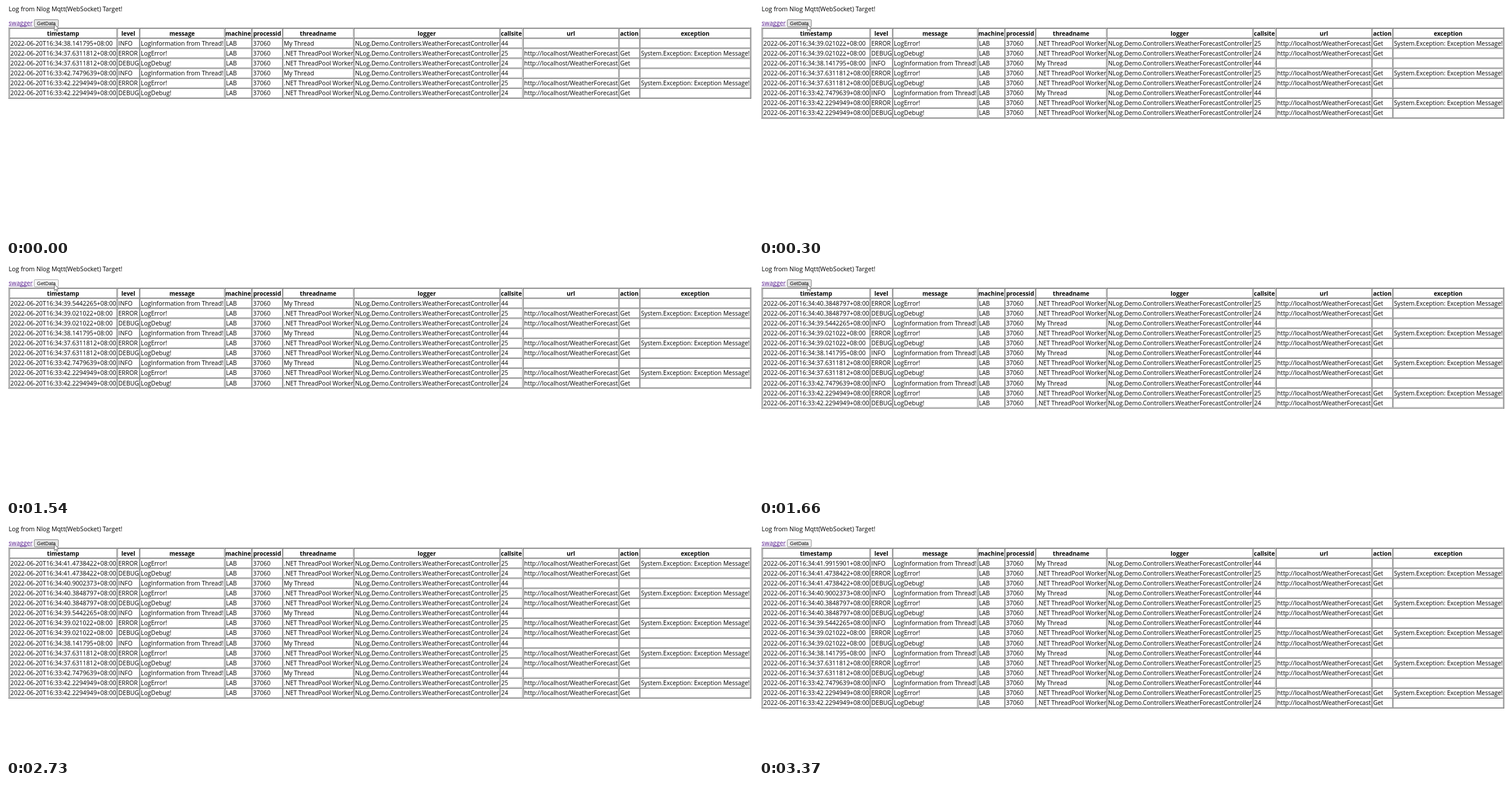
An HTML page with a canvas for the animation above (3.91 s loop, 1280x398 px).

```html
<!DOCTYPE html>
<html lang="en">
<head>
<meta charset="utf-8">
<title>Log table</title>
<style>
html, body { margin: 0; width: 100%; height: 100%; overflow: hidden; background: #fff; }
canvas { display: block; }
</style>
</head>
<body>
<canvas id="stage" width="1280" height="398"></canvas>
<script>
const ctx = document.getElementById('stage').getContext('2d');
const LOOP = 3910;
const SANS = '"Open Sans", "Noto Sans", sans-serif';
const BODY = `10.45px ${SANS}`;
const DIGITS = `10.58px ${SANS}`;
const HEAD = `bold 10.1px ${SANS}`;
const LEAD = `10.7px ${SANS}`;
const DARK = '#2c2c2c', GRAY = '#808080';

// Table geometry
const LEFT = 4.3, RIGHT = 1276.9, TOP = 36.9;
const LINE = 0.7, GAP = 0.8, PITCH = 17.12, BASE = 12.1, PAD = 1.8;
const edges = [5.8, 190.7, 229.3, 375, 421.5, 474.3, 596.1, 846.7, 886, 1050.6, 1086.3, 1276.2];
const heads = ['timestamp', 'level', 'message', 'machine', 'processid', 'threadname',
  'logger', 'callsite', 'url', 'action', 'exception'];

// Each stamp is one batch: requests and thread messages alternate
const stamps = ['33:42.2294949', '33:42.7479639', '34:37.6311812', '34:38.141795', '34:39.021022',
  '34:39.5442265', '34:40.3848797', '34:40.9002373', '34:41.4738422', '34:41.9915901'];
const arrivals = [300, 830, 1660, 2200, 2730, 3250];
const presses = [[150, 300], [1540, 1660]];
const path = [[0, 83, 31.5], [2850, 84, 34], [3000, 92, 62], [3120, 112, 190], [3250, 130, 386], [3370, 140, 420]];

function logRow(stamp, level, message, thread, line, isRequest) {
  return [`2022-06-20T16:${stamp}+08:00`, level, message, 'LAB', '37060', thread,
    'NLog.Demo.Controllers.WeatherForecastController', line,
    isRequest ? 'http://localhost/WeatherForecast' : '', isRequest ? 'Get' : '',
    level === 'ERROR' ? 'System.Exception: Exception Message!' : ''];
}

const batches = stamps.map((stamp, i) => i % 2
  ? [logRow(stamp, 'INFO', 'LogInformation from Thread!', 'My Thread', '44', false)]
  : [logRow(stamp, 'ERROR', 'LogError!', '.NET ThreadPool Worker', '25', true),
     logRow(stamp, 'DEBUG', 'LogDebug!', '.NET ThreadPool Worker', '24', true)]);

function text(str, x, y, font, color = '#000', align = 'left') {
  ctx.font = font;
  ctx.fillStyle = color;
  ctx.textAlign = align;
  ctx.fillText(str, x, y);
}

function bevel(x, y, w, h, light, shade) {
  ctx.fillStyle = light;
  ctx.fillRect(x, y, w, LINE);
  ctx.fillRect(x, y, LINE, h);
  ctx.fillStyle = shade;
  ctx.fillRect(x, y + h - LINE, w, LINE);
  ctx.fillRect(x + w - LINE, y, LINE, h);
}

function drawRow(cells, index, isHead) {
  const y = TOP + LINE + GAP + index * PITCH;
  cells.forEach((str, col) => {
    const x = edges[col], w = edges[col + 1] - GAP - x;
    bevel(x, y, w, PITCH - GAP, DARK, GRAY);
    if (isHead) text(str, x + w / 2, y + BASE, HEAD, '#000', 'center');
    else text(str, x + PAD, y + BASE, col ? BODY : DIGITS);
  });
}

function drawTable(t) {
  const count = 4 + arrivals.filter(at => t >= at).length;
  const rows = batches.slice(0, count).reverse().flat();
  const height = (rows.length + 1) * PITCH + 2 * LINE + GAP;
  bevel(LEFT, TOP, RIGHT - LEFT, height, GRAY, DARK);
  drawRow(heads, 0, true);
  rows.forEach((row, i) => drawRow(row, i + 1, false));
}

function drawButton(t) {
  const pressed = presses.some(([from, to]) => t >= from && t < to);
  const [fill, stroke] = pressed ? ['#f5f5f5', '#8d8d8d']
    : t < 3000 ? ['#e5e5e5', '#5c5c5c'] : ['#efefef', '#767676'];
  ctx.beginPath();
  ctx.roundRect(48.4, 23.4, 41.4, 12.4, 1.6);
  ctx.fillStyle = fill;
  ctx.fill();
  ctx.strokeStyle = stroke;
  ctx.lineWidth = 0.75;
  ctx.stroke();
  text('GetData', 69.1, 32.9, '8.6px "Liberation Sans", Arial, sans-serif', '#000', 'center');
}

function drawCursor(t) {
  const [, x, y] = path.filter(([at]) => t >= at).pop();
  ctx.save();
  ctx.translate(x, y);
  ctx.scale(0.66, 0.66);
  ctx.beginPath();
  [[0, 0], [0, 16], [3.7, 12.6], [6, 18], [8.5, 17], [6.2, 11.6], [11, 11.3]]
    .forEach(([px, py]) => ctx.lineTo(px, py));
  ctx.closePath();
  ctx.fillStyle = '#fff';
  ctx.fill();
  ctx.strokeStyle = '#222';
  ctx.lineWidth = 1;
  ctx.stroke();
  ctx.restore();
}

function draw(t) {
  ctx.fillStyle = '#fff';
  ctx.fillRect(0, 0, 1280, 398);
  text('Log from Nlog Mqtt(WebSocket) Target!', 4.5, 9.2, LEAD);
  text('swagger', 4.5, 32.6, LEAD, '#551a8b');
  ctx.fillRect(4.5, 33.8, 41.2, 0.7);
  drawButton(t);
  drawTable(t);
  drawCursor(t);
}

const start = performance.now();
function tick() {
  draw((performance.now() - start) % LOOP);
  requestAnimationFrame(tick);
}
tick();
</script>
</body>
</html>
```
